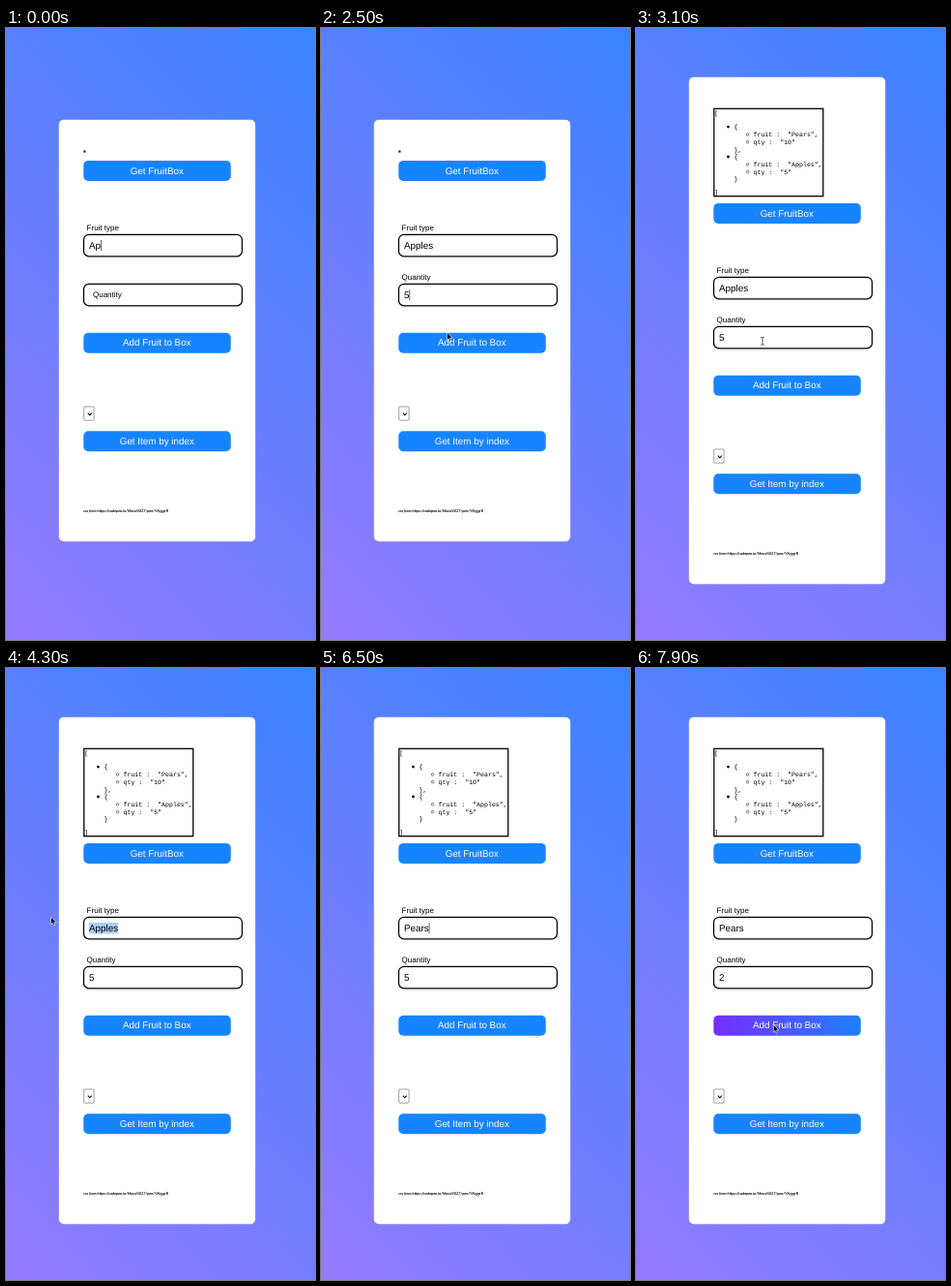
Animation, 320 px wide and 632 px high, one loop 8 s. Source, as an HTML page:

```html
<!DOCTYPE html>
<html lang="en">
<head>
<meta charset="utf-8">
<title>Fruit box form</title>
<style>
  html, body { margin: 0; width: 100%; height: 100%; overflow: hidden; }
  body { background: linear-gradient(45deg, #957afc, #3983ff); }
  svg { display: block; width: 100%; height: 100%; }
  text { font: 9.85px "Liberation Sans", Arial, sans-serif; text-rendering: geometricPrecision; white-space: pre; }
  .label { font-size: 8px; }
  .button text { fill: #fff; text-anchor: middle; }
  .code text { font: 6.6px "Liberation Mono", "Courier New", monospace; }
  .credit { font: italic 700 3.9px Lato, sans-serif; }
</style>
</head>
<body>
<svg id="stage" viewBox="0 0 320 632">
  <defs>
    <linearGradient id="hover"><stop stop-color="#762eff"/><stop offset="1" stop-color="#1f80ff"/></linearGradient>
  </defs>
</svg>
<script>
const DURATION = 8000;
const SHIFT = 44;
const LIST_SHOWN = 3100;
const TEXT_X = 86;
const FIELD = { left: 80.5, width: 164, height: 22.6 };
const BUTTON = { left: 80.3, width: 152.5, height: 21 };

const stage = document.getElementById("stage");

function add(parent, tag, attrs = {}, content = "") {
  const node = document.createElementNS("http://www.w3.org/2000/svg", tag);
  set(node, attrs);
  node.textContent = content;
  return parent.appendChild(node);
}
function set(node, attrs) {
  for (const key in attrs) node.setAttribute(key, attrs[key]);
}
function show(node, visible) {
  node.setAttribute("visibility", visible ? "visible" : "hidden");
}

const card = add(stage, "rect", { x: 54.8, width: 203.4, rx: 5, fill: "#fff" });
const emptyList = add(stage, "rect", { x: 80.3, y: 126.4, width: 2.2, height: 2.2, fill: "#222" });
const list = add(stage, "g", { class: "code" });
const form = add(stage, "g");

function buildList() {
  add(list, "rect", { x: 80.8, y: 83.3, width: 113, height: 90.4, fill: "none", stroke: "#000", "stroke-width": 1.3 });
  const line = (x, y, content) => add(list, "text", { x, y }, content);
  const entry = (y, fruit, qty, end) => {
    add(list, "circle", { cx: 95.5, cy: y - 2, r: 1.4 });
    line(101.5, y, "{");
    [`fruit :  "${fruit}",`, `qty :  "${qty}"`].forEach((content, i) => {
      const rowY = y + 7.8 * (i + 1);
      add(list, "circle", { cx: 115.6, cy: rowY - 2, r: 1.3, fill: "none", stroke: "#000", "stroke-width": 0.5 });
      line(121.5, rowY, content);
    });
    line(101.5, y + 23.4, end);
  };
  line(81.3, 90, "[");
  entry(104.1, "Pears", "10", "},");
  entry(135, "Apples", "5", "}");
  line(81.3, 172, "]");
}

function makeButton(top, caption) {
  const group = add(form, "g", { class: "button" });
  const face = add(group, "rect", { x: BUTTON.left, y: top, width: BUTTON.width, height: BUTTON.height, rx: 5 });
  add(group, "text", { x: 156.3, y: top + 13.6 }, caption);
  return { top, face };
}

function makeField(top, caption) {
  add(form, "rect", {
    x: FIELD.left, y: top, width: FIELD.width, height: FIELD.height, rx: 5.5,
    fill: "#fff", stroke: "#000", "stroke-width": 1.25
  });
  return {
    top,
    mark: add(form, "rect", { y: top + 5.6, height: 11.5, fill: "#a9d0fb" }),
    label: add(form, "text", { class: "label", x: 83.6, y: top - 3.9 }, caption),
    value: add(form, "text", { x: TEXT_X, y: top + 14.8 }),
    caret: add(form, "rect", { y: top + 5.8, width: 0.7, height: 11, fill: "#222" })
  };
}

buildList();
const fruit = makeField(213.3, "Fruit type");
const quantity = makeField(264.3, "Quantity");
const buttons = [
  makeButton(136.9, "Get FruitBox"),
  makeButton(314.8, "Add Fruit to Box"),
  makeButton(416.3, "Get Item by index")
];
add(form, "rect", { x: 80.7, y: 391, width: 10.4, height: 14.2, rx: 1, fill: "#fff", stroke: "#777", "stroke-width": 0.7 });
add(form, "path", { d: "M84.8 397.6l2 2.2 2-2.2", fill: "none", stroke: "#000", "stroke-width": 1.1 });
add(form, "text", { class: "credit", x: 80.2, y: 500.3 }, "css from https://codepen.io/Morul4027/pen/YXyggrR");

const arrow = add(stage, "path", {
  d: "M0 0V7.8L1.8 6.2 3 9 4.3 8.4 3.1 5.7H5.5Z",
  fill: "#000", stroke: "#fff", "stroke-width": 0.6
});
const beam = add(stage, "path", {
  d: "M-1.8-4Q0-4 0-3Q0-4 1.8-4M0-3V3M-1.8 4Q0 4 0 3Q0 4 1.8 4",
  fill: "none", stroke: "#333", "stroke-width": 0.8
});

// Each text holds from its start time until the next one.
const fruitTyping = [
  [0, "Ap"], [100, "App"], [300, "Appl"], [400, "Apple"], [500, "Apples"],
  [4800, "P"], [5100, "Pe"], [5200, "Pea"], [5300, "Pear"], [5500, "Pears"]
];
const quantityTyping = [[0, ""], [2000, "5"], [6900, "2"]];
const fruitCaret = [[0, 1000], [4800, 6000], [6500, 6800]];
const quantityCaret = [[1350, 1850], [2000, 2600], [6900, 7400]];

// Pointer journeys: time, x, y.
const journeys = [
  [[900, 128, 226], [1100, 127, 250], [1300, 124.6, 276.5], [2000, 124.6, 276.5]],
  [[2200, 126, 283], [2400, 130, 307], [2500, 130.5, 314.3], [2700, 131, 323.3], [3300, 131, 323.3],
   [3600, 130, 300], [3900, 119, 270], [4000, 110, 268], [4200, 38, 258], [4300, 46.6, 257], [4800, 46.6, 257]],
  [[7300, 54, 268], [7600, 104, 328], [7800, 140, 364], [7900, 142.3, 368.2], [8000, 142.3, 368.2]]
];

const within = (value, start, size) => value >= start && value < start + size;
const active = (spans, t) => spans.some(([from, to]) => t >= from && t < to);
const textAt = (steps, t) => steps.filter(([start]) => start <= t).pop()[1];

function pointerAt(t) {
  const path = journeys.find(p => t >= p[0][0] && t < p[p.length - 1][0]);
  if (!path) return null;
  const i = path.findIndex(point => point[0] > t);
  const [t0, x0, y0] = path[i - 1];
  const [t1, x1, y1] = path[i];
  const k = (t - t0) / (t1 - t0);
  return { x: x0 + (x1 - x0) * k, y: y0 + (y1 - y0) * k };
}

function drawField(field, content, caretOn, markFrom) {
  if (field.value.textContent !== content) field.value.textContent = content;
  const end = TEXT_X + (content ? field.value.getComputedTextLength() : 0.4);
  field.caret.setAttribute("x", end);
  show(field.caret, caretOn);
  const marked = markFrom < end;
  show(field.mark, marked);
  if (marked) set(field.mark, { x: markFrom, width: end - markFrom });
}

function render(t) {
  const opened = t >= LIST_SHOWN;
  const shift = opened ? SHIFT : 0;
  set(card, { y: 94.7 - shift, height: 435.6 + 2 * shift });
  show(emptyList, !opened);
  show(list, opened);
  form.setAttribute("transform", `translate(0 ${shift})`);

  const pointer = pointerAt(t);
  const dragging = t >= 3900 && t < 4800;
  const dragStart = dragging ? Math.max(TEXT_X, TEXT_X + 5 * Math.round((pointer.x - TEXT_X) / 5)) : Infinity;
  drawField(fruit, textAt(fruitTyping, t), active(fruitCaret, t), dragStart);
  drawField(quantity, textAt(quantityTyping, t), active(quantityCaret, t), t >= 6800 && t < 6900 ? TEXT_X : Infinity);

  const k = Math.min(1, Math.max(0, (t - 1300) / 450));
  const lift = k * k * (3 - 2 * k);
  set(quantity.label, { x: 90 - 6.4 * lift, y: 278.2 - 17.8 * lift });

  const inField = pointer && [fruit, quantity].some(f =>
    within(pointer.x, FIELD.left, FIELD.width) && within(pointer.y - shift, f.top, FIELD.height));
  show(arrow, pointer && !inField);
  show(beam, inField);
  if (pointer) {
    const transform = `translate(${pointer.x} ${pointer.y})`;
    set(arrow, { transform });
    set(beam, { transform });
  }
  for (const { top, face } of buttons) {
    const hovered = pointer && within(pointer.x, BUTTON.left, BUTTON.width)
      && within(pointer.y - shift, top, BUTTON.height);
    face.setAttribute("fill", hovered ? "url(#hover)" : "#1784ff");
  }
}

const start = performance.now();
function tick() {
  render((performance.now() - start) % DURATION);
  requestAnimationFrame(tick);
}
tick();
</script>
</body>
</html>
```
